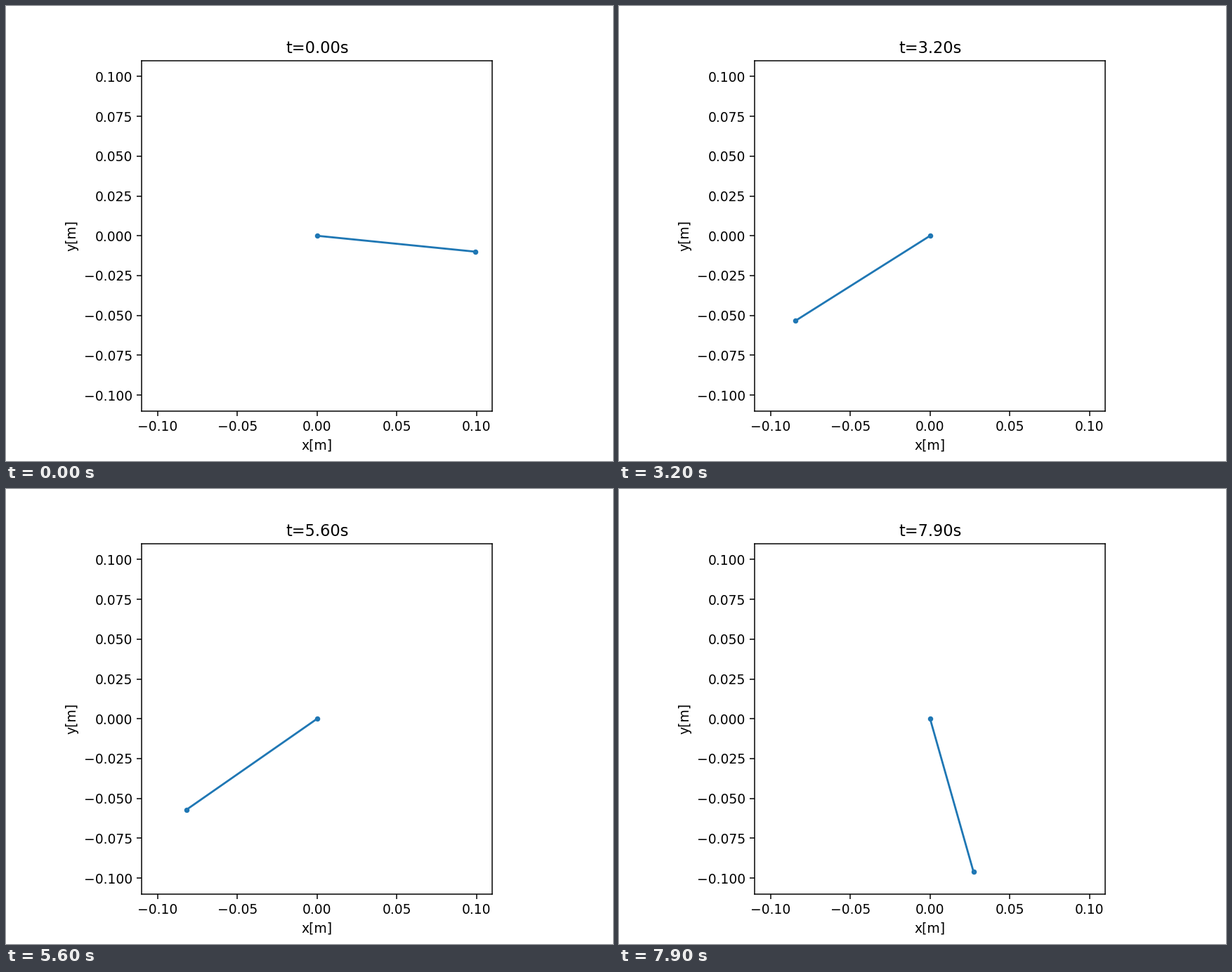
Write a matplotlib script that moves like this. It is 864x648 px and loops after 8000 ms.

```python
import numpy as np
import matplotlib.pyplot as plt
from matplotlib.animation import FuncAnimation

G = 9.7996       # m/s^2
L = 0.1          # m
Y0 = -0.01       # starting height of the bob
FRAMES = 80
INTERVAL = 100   # ms
SUBSTEPS = 200


def deriv(state):
    theta, omega = state
    return np.array([omega, -G / L * np.sin(theta)])


def rk4(state, h):
    k1 = deriv(state)
    k2 = deriv(state + h / 2 * k1)
    k3 = deriv(state + h / 2 * k2)
    k4 = deriv(state + h * k3)
    return state + h / 6 * (k1 + 2 * k2 + 2 * k3 + k4)


def swing():
    """Pendulum angle from the vertical at each frame."""
    h = INTERVAL / 1000 / SUBSTEPS
    state = np.array([np.arccos(-Y0 / L), 0.0])
    angles = []
    for _ in range(FRAMES):
        angles.append(state[0])
        for _ in range(SUBSTEPS):
            state = rk4(state, h)
    return np.array(angles)


theta = swing()
xs, ys = L * np.sin(theta), -L * np.cos(theta)

plt.rcParams["font.family"] = "DejaVu Sans"
fig, ax = plt.subplots(figsize=(6.4, 4.8), dpi=135)
ax.set_xlim(-0.11, 0.11)
ax.set_ylim(-0.11, 0.11)
ax.set_aspect("equal")
ax.set_xticks(np.linspace(-0.1, 0.1, 5))
ax.set_yticks(np.linspace(-0.1, 0.1, 9))
ax.set_xlabel("x[m]")
ax.set_ylabel("y[m]")
rod, = ax.plot([], [], ".-", color="tab:blue")
title = ax.set_title("t=0.00s")


def update(i):
    rod.set_data([0, xs[i]], [0, ys[i]])
    title.set_text(f"t={i * INTERVAL / 1000:.2f}s")
    return rod, title


anim = FuncAnimation(fig, update, frames=FRAMES, interval=INTERVAL,
                     repeat=True, repeat_delay=0)
plt.show()
```
